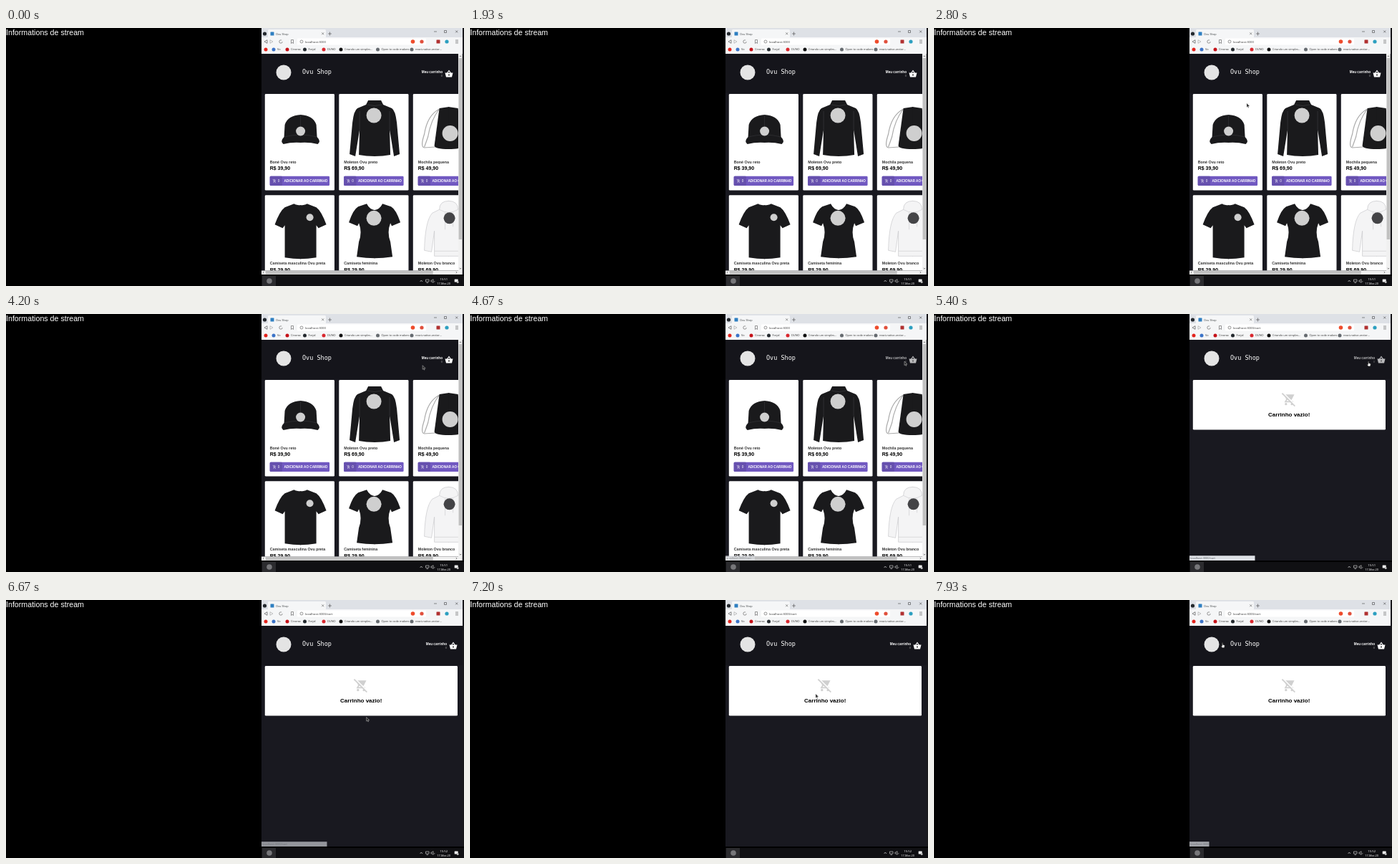
An HTML page with a canvas for the animation above (8 s loop, 640 by 360 pixels).

```html
<!DOCTYPE html>
<html lang="pt">
<head>
<meta charset="utf-8">
<title>Ovu Shop</title>
<style>
html, body { margin: 0; width: 100%; height: 100%; overflow: hidden; background: #000; }
canvas { display: block; width: 640px; height: 360px; }
</style>
</head>
<body>
<canvas id="stage"></canvas>
<script>
const LOOP = 8000, CART_AT = 5400, CLOCK_AT = 5600;
const ARIAL = '"Liberation Sans", Arial, sans-serif';
const UI = '"Open Sans", "Noto Sans", sans-serif';
const MONO = '"DejaVu Sans Mono", monospace';
const INK = '#1a1a1c', CHROME = '#f5f6f7', GREY = '#555';

const canvas = document.getElementById('stage');
const ctx = canvas.getContext('2d');
const dpr = window.devicePixelRatio || 1;
canvas.width = 640 * dpr;
canvas.height = 360 * dpr;

const ARROW = new Path2D('M0 0V5.6L1.3 4.4 2.2 6.4 3 6 2.2 4.1H4Z');
const HAND = new Path2D('M-.5 0H.6V2.6L3.4 3.4 2.7 7H-.3L-2.2 4 -.5 4.6Z');

// Left halves of each product, mirrored at the card's centre line
const CAP = 'M.5 29Q-18 30-22 43L-23 60Q-29 66-24 70Q-12 67 .5 68';
const JACKET = 'M.5 9H-9L-12 15-24 20Q-29 23-31 40L-35 84-27 87-21 50-22 85Q-12 87 .5 87';
const BAG = 'M.5 18L-13 20-20 72Q-20 77 .5 77';
const TEE = 'M.5 14Q-6 14-9 12L-22 17Q-29 22-36 41L-25 46-22 42V87Q-10 89 .5 89';
const BLOUSE = 'M.5 21Q-7 20-11 12L-23 16Q-30 20-36 38L-24 43-22 39Q-17 52-22 65L-25 86Q-12 88 .5 88';
const HOODIE = 'M.5 8Q-13 8-13 20L-23 25Q-33 36-34 77L-24 79-20 50V85H.5';

const PRODUCTS = [
  { name: 'Boné Ovu reto', price: '39,90', half: CAP, badge: [0, 52, 6.5] },
  { name: 'Moleton Ovu preto', price: '69,90', half: JACKET, badge: [-1, 30, 10.5] },
  { name: 'Mochila pequena', price: '49,90', half: BAG, badge: [2, 55, 11], cords: true },
  { name: 'Camiseta masculina Ovu preta', price: '29,90', half: TEE, badge: [13, 31, 5] },
  { name: 'Camiseta feminina', price: '29,90', half: BLOUSE, badge: [-1, 32, 10.5] },
  { name: 'Moleton Ovu branco', price: '69,90', half: HOODIE, badge: [1, 32, 8], white: true }
];

const BOOKMARKS = [
  [363, '#e3231c', ''], [374, '#3b73c8', 'Vo'], [393, '#c51219', 'Cinorax'],
  [417.5, '#24292e', 'Forjal'], [444, '#d9272e', 'DUNO'], [468, '#111', 'Criando um simples...'],
  [519.5, '#666b70', 'Open to code makers'], [567, '#666b70', 'react-native-vector...']
];

function rect(x, y, w, h, color, r = 0) {
  ctx.fillStyle = color;
  ctx.beginPath();
  ctx.roundRect(x, y, w, h, r);
  ctx.fill();
}
function dot(x, y, r, color) {
  ctx.fillStyle = color;
  ctx.beginPath();
  ctx.arc(x, y, r, 0, 7);
  ctx.fill();
}
function ring(x, y, r, color, end = 7) {
  ctx.strokeStyle = color;
  ctx.lineWidth = 0.6;
  ctx.beginPath();
  ctx.arc(x, y, r, 0, end);
  ctx.stroke();
}
function text(str, x, y, font, color, align = 'left') {
  ctx.font = font;
  ctx.fillStyle = color;
  ctx.textAlign = align;
  ctx.fillText(str, x, y);
}
function shape(path, x, y, fill, stroke, width = 0.6, scale = 1) {
  const p = path instanceof Path2D ? path : new Path2D(path);
  ctx.save();
  ctx.translate(x, y);
  ctx.scale(scale, Math.abs(scale));
  if (fill) { ctx.fillStyle = fill; ctx.fill(p); }
  if (stroke) { ctx.strokeStyle = stroke; ctx.lineWidth = width; ctx.stroke(p); }
  ctx.restore();
}
const line = (path, x, y, color, width) => shape(path, x, y, null, color, width);
const bold = size => `bold ${size}px ${ARIAL}`;
const ui = size => `${size}px ${UI}`;
const ramp = (t, from, to) => Math.min(1, Math.max(0, (t - from) / (to - from)));

// Icons live on a 24-unit grid
function basket(x, y, size, color) {
  const k = size / 24;
  shape('M1 9H23L20 21H4Z', x, y, color, null, 0, k);
  shape('M7 10L12 3 17 10', x, y, null, color, 2.4, k);
  dot(x + 12 * k, y + 15 * k, 2 * k, '#222');
}
function cart(x, y, size, color, full) {
  const k = size / 24;
  shape('M1 3H4L8.500 12 6 16H19', x, y, null, color, 2, k);
  if (full) shape('M6 4H21L16.500 13H9Z', x, y, color, null, 0, k);
  else shape('M8 12H16L20 5M8 5H15M11.500 1V9', x, y, null, color, 2, k);
  for (const wheel of [7, 17]) dot(x + wheel * k, y + 20 * k, 2 * k, color);
}
function emptyCart(x, y, size) {
  cart(x, y, size, '#d0d0d0', true);
  shape('M1.500 .5L24 23', x, y, null, '#fff', 2, size / 24);
  shape('M.5 2L22 23.500', x, y, null, '#d0d0d0', 2, size / 24);
}

function browser(inCart) {
  rect(357, 0, 281, 14, '#dee1e6');
  rect(366, 2, 81, 12, CHROME, 1.5);
  rect(357, 13, 281, 23, CHROME);
  dot(361.5, 8, 2.6, '#24292e');
  rect(369.5, 5.5, 5, 5, '#2f7fc1', 0.5);
  text('Ovu Shop', 377, 9.6, ui(3.9), '#3c4043');
  const cross = 'M-1.500-1.500L1.500 1.500M1.500-1.500L-1.500 1.500';
  line(cross, 442.7, 7.8, GREY, 0.6);
  line('M-2.500 0H2.500M0-2.500V2.500', 452.5, 8, '#444', 0.6);
  line('M-2 0H2', 600, 5, '#222', 0.5);
  line('M-1.500-1.500H1.500V1.500H-1.500Z', 614, 5, '#222', 0.5);
  line(cross, 629.7, 5, '#222', 0.5);

  const triangle = 'M2-2.300L-2 0 2 2.300Z';
  line(triangle, 363, 19, GREY, 0.7);
  shape(triangle, 371, 19, null, '#aaa', 0.7, -1);
  ring(384, 19, 2.2, GREY, 5.3);
  line('M-1.500-2.500H1.500V2.500L0 1.200-1.500 2.500Z', 400, 19, GREY, 0.6);
  rect(407, 14.5, 180, 9, '#fff', 1);
  ring(413, 19, 2, GREY);
  text(inCart ? 'localhost:3000/cart' : 'localhost:3000', 418, 20.6, ui(4.3), '#333');
  dot(568.5, 19, 2.8, '#ee4b2b');
  dot(581, 19, 2.6, '#e0503c');
  rect(601.5, 16.5, 5, 5, '#b03030', 0.5);
  dot(616, 19, 2.6, '#2c9fc0');
  for (const y of [17, 19, 21]) line('M-2 0H2', 630, y, GREY, 0.6);

  for (const [x, color, label] of BOOKMARKS) {
    dot(x, 30, 2.5, color);
    text(label, x + 5, 31.3, ui(3.9), '#333');
  }
}

function header(right, hover) {
  rect(357, 36, 281, 55, '#15151b');
  dot(388, 62, 10.5, '#e4e4e4');
  text('Ovu Shop', 414, 63.6, `8.5px ${MONO}`, '#fff');
  ctx.globalAlpha = 1 - 0.3 * hover;
  text('Meu carrinho', right - 15, 63, bold(4.67), '#fff', 'right');
  text('0', right - 15, 68.4, `4px ${ARIAL}`, '#999', 'right');
  basket(right - 12, 58, 12, '#fff');
  ctx.globalAlpha = 1;
}

function garment({ half, badge: [bx, by, r], white, cords }, x, y) {
  if (cords) line('M-13 21Q-30 30-34 56Q-40 74-34 75L-19 74M-13 21Q-25 36-29 60L-34 74', x, y, '#aaa', 1.2);
  const fill = white ? '#f4f4f5' : INK;
  for (const side of [1, -1]) shape(half, x, y, fill, white && '#c9c9cc', 0.7, side);
  if (white) line('M-13 20Q0 28 13 20M-5 24V48M6 24V44M-20 78H20', x, y, '#d0d0d3', 0.7);
  if (half === JACKET) line('M-10 15Q0 18 10 15M-21 24V50M21 24V50', x, y, '#414144', 0.6);
  if (half === CAP) line('M-23 60Q0 54 23 60M0 29V45', x, y, '#3c3c40', 0.5);
  dot(x + bx, y + by, r, white ? '#444447' : '#cfcfcf');
}

function card(item, i) {
  const x = 361.8 + i % 3 * 103.5, y = 92 + Math.floor(i / 3) * 141.3;
  rect(x, y, 97.2, 134.6, '#fff', 1.4);
  garment(item, x + 49.8, y);
  text(item.name, x + 6.9, y + 96.6, bold(5.33), '#333');
  text('R$ ' + item.price, x + 6.9, y + 106.4, bold(7), '#000');
  rect(x + 6.9, y + 114.7, 83.4, 13.4, '#7159c1', 1.4);
  rect(x + 6.9, y + 114.7, 17.3, 13.4, '#6650ae', 1.4);
  cart(x + 10.7, y + 118.7, 5.4, '#fff');
  text('0', x + 17.9, y + 123.1, `4.67px ${ARIAL}`, '#fff');
  text('ADICIONAR AO CARRINHO', x + 26.6, y + 123.1, bold(4.67), '#fff');
}

function scrollbars() {
  rect(632, 36, 5.7, 308, '#f1f1f1');
  rect(632.6, 42, 4.5, 253, '#c1c1c1');
  rect(357, 338.4, 275, 5.6, '#f1f1f1');
  rect(362.7, 339, 234, 4.4, '#c1c1c1');
  line('M-1.200 .6L0-.6 1.200 .6', 634.8, 39.4, GREY, 0.8);
  line('M-1.200-.6L0 .6 1.200-.6', 634.8, 335.6, GREY, 0.8);
  line('M.6-1.200L-.6 0 .6 1.200', 359.7, 341.2, GREY, 0.8);
  line('M-.6-1.200L.6 0-.6 1.200', 629.4, 341.2, GREY, 0.8);
}

function shopPage(hover) {
  ctx.save();
  ctx.beginPath();
  ctx.rect(357, 36, 275, 302.4);
  ctx.clip();
  header(625, hover);
  PRODUCTS.forEach(card);
  ctx.restore();
  scrollbars();
}

function cartPage(hover) {
  header(631, hover);
  rect(361.8, 92, 269.2, 69.6, '#fff', 1.4);
  emptyCart(486, 109, 20);
  text('Carrinho vazio!', 496.2, 143, bold(8), '#000', 'center');
}

function statusBar(label, width, alpha) {
  ctx.globalAlpha = alpha;
  rect(357, 337.2, width, 6.8, '#dee1e6');
  text(label, 358.3, 342, ui(3.9), '#5f6368');
  ctx.globalAlpha = 1;
}

function taskbar(t) {
  rect(357, 344, 283, 2, '#000');
  rect(357, 346, 283, 14, '#101013');
  rect(358, 346, 19, 14, '#2b2b2e');
  dot(368, 353, 3.8, '#77777a');
  line('M-1.700 1L0-1 1.700 1', 580.3, 353, '#ddd', 0.7);
  line('M-2-2H2.500V1H-2ZM-1 2.500H1.500', 588.5, 353, '#ddd', 0.6);
  line('M-3-1H-1.700L0-2.400V2.400L-1.700 1H-3Z', 597, 353, '#ddd', 0.6);
  ring(597, 353, 2, '#ccc', 1);
  text(t < CLOCK_AT ? '15:51' : '15:52', 611.7, 351.8, ui(4.2), '#fff', 'center');
  text('17-Mar-20', 611.7, 358.3, ui(3.9), '#fff', 'center');
  rect(626.7, 350.5, 5, 4, '#eee', 0.5);
  dot(631.2, 354.5, 1.5, '#bbb');
}

// Each glide eases out from the last resting place; bend bows it vertically
const GLIDES = [
  { from: 1930, to: 2800, x: 437, y: 105, bend: 0 },
  { from: 3870, to: 4670, x: 607, y: 66, bend: 0 },
  { from: 6330, to: 7200, x: 483, y: 131, bend: 46 },
  { from: 7400, to: 7960, x: 403, y: 63, bend: -20 }
];

function pointer(t) {
  let x = 353, y = 230;
  for (const g of GLIDES) {
    const u = ramp(t, g.from, g.to), k = 1 - (1 - u) ** 3.6;
    x += (g.x - x) * k;
    y += (g.y - y) * k + g.bend * Math.sin(Math.PI * u);
  }
  if (x < 357) return;
  const onLink = (t >= CART_AT && t < 6350) || t > 7820;
  if (onLink) shape(HAND, x, y, '#fff', '#111');
  else shape(ARROW, x, y, '#222', '#c8c8c8', 0.5);
}

function draw(t) {
  const inCart = t >= CART_AT;
  const hover = ramp(t, 4380, 4600) - ramp(t, 6340, 6560);
  ctx.setTransform(dpr, 0, 0, dpr, 0, 0);
  rect(0, 0, 640, 360, '#000');
  text('Informations de stream', 0, 9.8, `10.67px ${ARIAL}`, '#fff');
  browser(inCart);
  rect(357, 36, 281, 308, '#191920');
  rect(638, 0, 2, 346, '#18181b');
  (inCart ? cartPage : shopPage)(hover);
  const leaving = ramp(t, 6400, 7130);
  if (leaving < 1) statusBar('localhost:3000/cart', inCart ? 91.5 : 41, ramp(t, 4580, 4730) - leaving);
  else statusBar('localhost:3000', 27.5, 0.7 * ramp(t, 7840, 7930));
  taskbar(t);
  pointer(t);
}

const start = performance.now();
function tick() {
  draw((performance.now() - start) % LOOP);
  requestAnimationFrame(tick);
}
tick();
</script>
</body>
</html>
```
